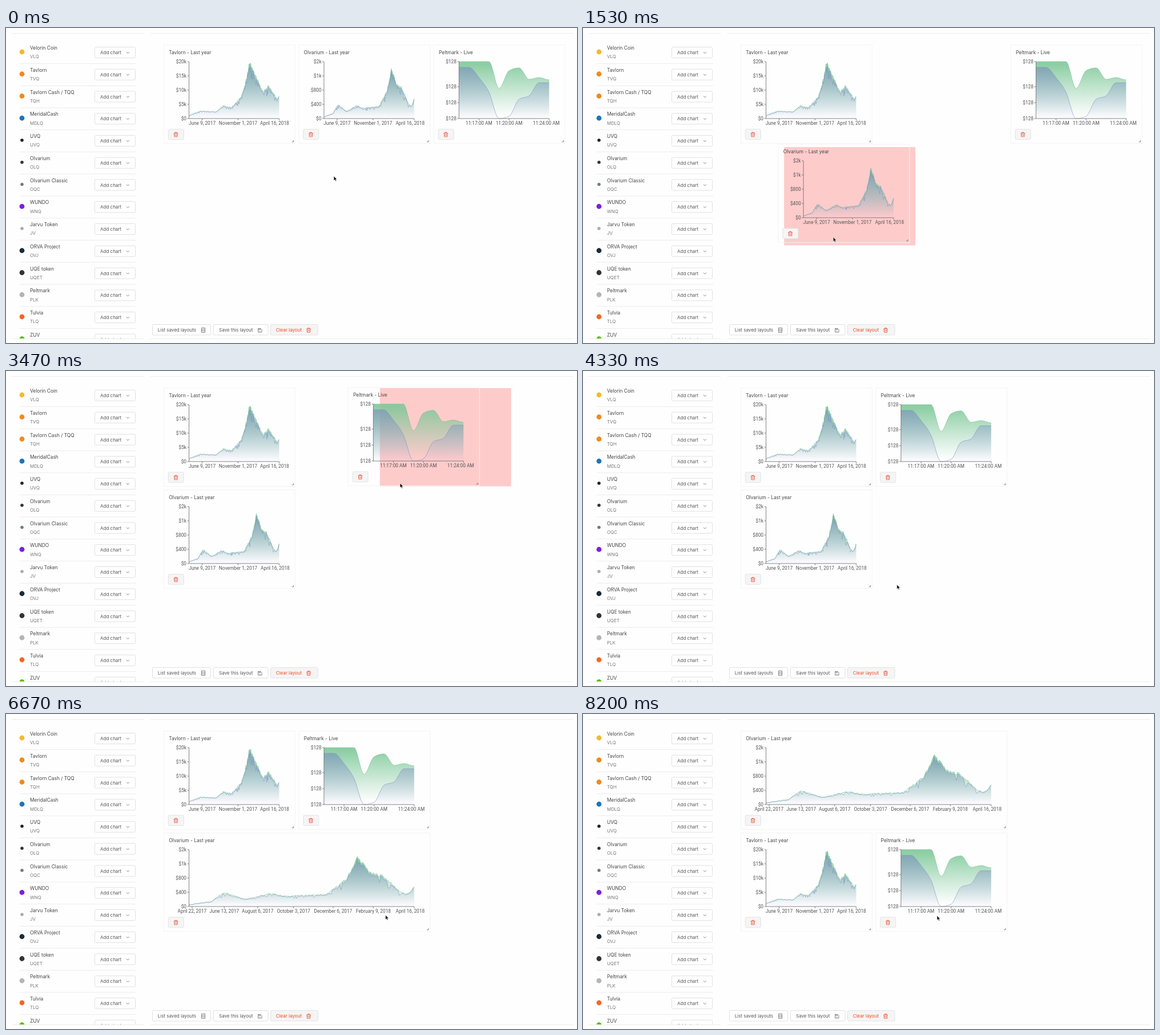
Write an HTML page that moves like this. It is 1000 px wide and 553 px high and loops after 8.27 s.

```html
<!DOCTYPE html>
<html lang="en">
<head>
<meta charset="utf-8">
<title>Coin dashboard</title>
<style>
  html, body { margin: 0; width: 100%; height: 100%; overflow: hidden; background: #fefefe; }
  svg { display: block; width: 100vw; height: 100vh; font: 8.4px Inter, sans-serif; fill: #444; }
  .small { font-size: 8px; fill: #555; }
  .symbol { font-size: 7.9px; fill: #777; }
  .axis { font: 8.3px Roboto, sans-serif; fill: #555; }
  .rule { stroke: #ececec; stroke-width: 1; }
  .button { fill: #fff; stroke: #d9d9d9; stroke-width: .8; }
  .muted { fill: #f5f5f5; stroke: #dedede; }
  .line { fill: none; stroke: #666; stroke-width: .8; }
  .danger { fill: none; stroke: #ea5539; stroke-width: .9; }
</style>
</head>
<body>
<svg viewBox="0 0 1000 553">
  <defs>
    <linearGradient id="green" x2="0" y2="1">
      <stop offset=".05" stop-color="#7cc797" stop-opacity=".87"/>
      <stop offset=".95" stop-color="#82ca9d" stop-opacity="0"/>
    </linearGradient>
    <linearGradient id="blue" x2="0" y2="1">
      <stop offset=".05" stop-color="#7a8cbe" stop-opacity=".58"/>
      <stop offset="1" stop-color="#8c9cd0" stop-opacity=".03"/>
    </linearGradient>
    <clipPath id="list"><rect width="250" height="545"/></clipPath>
    <path id="trash" d="M-3.8-2.3h7.6M-1.5-2.3v-1.5h3v1.5M-2.9-2.3l.3 6.1h5.2l.3-6.1M-1-.5v2.6M1-.5v2.6"/>
  </defs>
  <g id="chrome"></g>
  <g id="cards"></g>
  <path id="pointer" d="M0 0v8l1.9-1.7 1.2 2.8 1.5-.7-1.2-2.6h2.5z" fill="#111" stroke="#fff" stroke-width=".6"/>
</svg>
<script>
const LOOP = 8270, FRAME = 1000 / 15;
const LEFT = 276.5, COLUMN = 59.1, GAP = 6.5, ROWS = [30, 209], HEIGHT = 172.5;
const $ = id => document.getElementById(id);

const mix = (a, b, u) => a + (b - a) * u;
const clamp = (v, lo, hi) => Math.min(hi, Math.max(lo, v));
const ease = u => { u = clamp(u, 0, 1); return u * u * (3 - 2 * u); };
const columnX = n => LEFT + n * COLUMN;
const spanWidth = n => n * COLUMN - GAP;
const text = (x, y, label, attrs = '') => `<text x="${x}" y="${y}" ${attrs}>${label}</text>`;
const box = (x, y, w, h, cls = '') => `<rect class="button ${cls}" x="${x}" y="${y}" width="${w}" height="${h}" rx="2"/>`;
const trash = (x, y) => `<use href="#trash" class="danger" x="${x}" y="${y}"/>`;
const path = (d, cls = 'line') => `<path class="${cls}" d="${d}"/>`;

// Linear interpolation through [position, ...values] key points.
function along(points, at) {
  const i = clamp(points.findIndex(p => p[0] > at), 1, points.length - 1);
  const end = at >= points.at(-1)[0];
  const [a, b] = end ? points.slice(-2) : [points[i - 1], points[i]];
  const u = clamp((at - a[0]) / (b[0] - a[0]), 0, 1);
  return a.slice(1).map((v, k) => mix(v, b[k + 1], u));
}

// ---- static sidebar and toolbar ----
const coins = [
  ['Velorin Coin', 'VLQ', '#f3ba2f'], ['Tavlorn', 'TVQ', '#f08a1d'],
  ['Tavlorn Cash / TQQ', 'TQH', '#f08a1d'], ['MeridalCash', 'MDLQ', '#1c75bc'],
  ['UVQ', 'UVQ', '#222'], ['Olvarium', 'OLQ', '#333'],
  ['Olvarium Classic', 'OQC', '#6d7f78'], ['WUNDO', 'WNQ', '#7a1fe0'],
  ['Jarvu Token', 'JV', '#aaa'], ['ORVA Project', 'OVJ', '#1b2a3a'],
  ['UQE token', 'UQET', '#333'], ['Peltmark', 'PLK', '#b5b5b5'],
  ['Tulvia', 'TLQ', '#f26822'], ['ZUV', 'ZUV', '#58bf00']
];
const slimIcons = ['UVQ', 'OLQ', 'OQC', 'JV'];

const coinRow = ([name, symbol, color], i) => `<g transform="translate(0 ${i * 38.75})">
  <circle cx="28" cy="42" r="${slimIcons.includes(symbol) ? 2.8 : 4.4}" fill="${color}"/>
  ${text(42, 38.2, name)}${text(42, 53.4, symbol, 'class="symbol"')}
  ${box(155.5, 33.5, 71, 19)}${text(165, 46, 'Add chart', 'class="small"')}
  ${path('M211 42l2.4 2.5 2.4-2.5')}${path('M24 62.5H228', 'rule')}</g>`;

$('chrome').innerHTML =
  path('M10 9.5H241M253 9.5H993M10 545.5H241M253 545.5H993', 'rule') +
  `<g clip-path="url(#list)">${coins.map(coinRow).join('')}</g>` +
  box(256.5, 520.5, 102, 18.5) + text(265.7, 533.2, 'List saved layouts', 'class="small"') +
  path('M342.5 526.5h6v8h-6zM342.5 529.2h6M342.5 531.8h6') +
  box(363.5, 520.5, 95.5, 18.5) + text(373, 533.2, 'Save this layout', 'class="small"') +
  path('M441.5 527.5h4.5l2 2v4.5h-6.5zM443 527.5v2h2.5v-2M443.5 532h2') +
  box(463.5, 520.5, 82.5, 18.5, 'muted') +
  text(472.7, 533.2, 'Clear layout', 'class="small" style="fill:#f04a24"') + trash(530, 530.5);

// ---- chart data: [fraction, high, low] ----
const DAYS = 364, MINUTES = 9;
const random = n => { const s = Math.sin(n * 12.9898) * 43758.5453; return s - Math.floor(s); };

// A rough daily price around a few turning points, with now and then a deep low.
const dailySeries = (turns, seed) => Array.from({ length: DAYS / 2 + 1 }, (_, i) => {
  const at = 2 * i / DAYS;
  const high = Math.min(100, along(turns, at)[0] * (1 + .1 * (random(i + seed) - .5)));
  return [at, high, high * (.95 - .25 * random(i + seed * 3) ** 9)];
});

// Monotone cubic through evenly spaced values.
function smoothAt(v, at) {
  const slope = i => {
    const a = v[i] - v[i - 1], b = v[i + 1] - v[i];
    return a * b > 0 ? Math.sign(a) * Math.min(2 * Math.abs(a), 2 * Math.abs(b), Math.abs(a + b) / 2) : 0;
  };
  const k = Math.min(at | 0, v.length - 2), u = at - k, w = 1 - u;
  return v[k] * w * w * (1 + 2 * u) + slope(k) * u * w * w + v[k + 1] * u * u * (3 - 2 * u) - slope(k + 1) * u * u * w;
}
const liveHigh = [100, 100, 100, 100, 53, 84, 89, 69, 72, 68];
const liveLow = [90, 90, 72, 46, 0, 4, 34, 40, 63, 63];
const liveSeries = Array.from({ length: 109 }, (_, i) =>
  [i / 108, smoothAt(liveHigh, i / 12), smoothAt(liveLow, i / 12)]);

const dateLabel = day => new Date(Date.UTC(2017, 3, 17 + day))
  .toLocaleDateString('en-US', { month: 'long', day: 'numeric', year: 'numeric', timeZone: 'UTC' });

// Wider charts have room for more dates.
function dateTicks(w) {
  const days = w < 220 ? [53, 198] : w < 360 ? [54, 124, 203, 284] : [5, 57, 111, 169, 233, 298];
  return [...days, DAYS].map(day => [day / DAYS, dateLabel(day)]);
}
const timeTicks = () => [2, 5, MINUTES].map(m => [m / MINUTES, `11:${15 + m}:00 AM`]);

const cards = {
  first: {
    title: 'Tavlorn - Last year', home: [columnX(0), ROWS[0]], ticks: dateTicks, endShift: 8,
    labels: ['$0', '$5k', '$10k', '$15k', '$20k'],
    series: dailySeries([[0, 5], [.12, 13], [.3, 12], [.38, 23], [.47, 19], [.57, 36], [.62, 56], [.672, 98],
      [.72, 80], [.82, 46], [.88, 57], [.98, 33], [1, 41]], 7)
  },
  live: {
    title: 'Peltmark - Live', home: [columnX(8), ROWS[0]], ticks: timeTicks, endShift: 5,
    levels: [0, 28, 56, 100], labels: Array(4).fill('$128'), series: liveSeries
  },
  second: {
    title: 'Olvarium - Last year', home: [columnX(4), ROWS[0]], ticks: dateTicks, endShift: 7,
    labels: ['$0', '$400', '$800', '$1k', '$2k'],
    series: dailySeries([[0, 3], [.1, 9], [.155, 25], [.25, 13], [.37, 23], [.42, 18], [.61, 21], [.7, 48],
      [.748, 86], [.81, 57], [.86, 54], [.94, 25], [.97, 21], [1, 34]], 31)
  }
};

// ---- motion ----
const pointerPath = [
  [0, 574, 260], [600, 609, 193], [900, 609, 193], [1530, 439, 367], [1750, 383, 372],
  [3000, 840, 198], [3300, 840, 198], [3470, 687, 197], [3650, 612, 200], [4330, 550, 375],
  [4800, 503, 378], [5330, 503, 378], [5930, 696, 361], [6130, 745, 368],
  [6950, 622, 345], [7180, 622, 345], [7400, 601, 227], [7600, 612, 172], [8200, 620, 354]
];
const pointerAt = t => along(pointerPath, t);

const SETTLE = 200, SWAP = 7520;
const resize = { start: 4800, end: 6200 };
const moves = [
  { card: 'second', start: 600, end: 1750, to: [columnX(0), ROWS[1]] },
  { card: 'live', start: 3000, end: 3650, to: [columnX(4), ROWS[0]] },
  { card: 'second', start: 6950, end: 7600, to: [columnX(0), ROWS[0]] },
  { card: 'first', start: SWAP, end: SWAP, to: [columnX(0), ROWS[1]] },
  { card: 'live', start: SWAP, end: SWAP, to: [columnX(4), ROWS[1]] }
];

// Trailing average, the way a short CSS transition follows its goal.
function lag(fn, t, span) {
  let sum = 0;
  for (let i = 0; i < 25; i++) sum += fn(t - span * i / 25);
  return sum / 25;
}

function positionAt(name, t) {
  let pos = cards[name].home;
  for (const m of moves) {
    if (m.card !== name || t < m.start) continue;
    const grab = pointerAt(m.start), now = pointerAt(Math.min(t, m.end));
    const u = ease((t - m.end) / SETTLE), from = pos;
    pos = m.to.map((goal, k) => mix(from[k] + now[k] - grab[k], goal, u));
  }
  return pos;
}

const draggedWidth = t => spanWidth(4) + pointerAt(clamp(t, resize.start, resize.end))[0] - pointerAt(resize.start)[0];
const widthAt = (name, t) => name !== 'second' ? spanWidth(4)
  : mix(lag(draggedWidth, t, 200), spanWidth(8), ease((t - resize.end) / SETTLE));

function snapped(name, t) {
  const [x, y] = positionAt(name, t);
  const column = Math.max(0, Math.round((x - LEFT) / COLUMN));
  return [columnX(column), column >= 4 || y < 58 ? ROWS[0] : ROWS[1]];
}

const placeholder = (x, y, w) =>
  `<rect x="${x}" y="${y}" width="${w}" height="${HEIGHT}" fill="#f00" opacity=".2"/>`;

function chart(card, w, areaWidth) {
  const x0 = 44, base = 129, end = x0 + w;
  const { labels, levels = labels.map((_, i) => i * 25) } = card;
  const area = (k, fill, stroke) => {
    const line = card.series.map(p => `${(x0 + p[0] * areaWidth).toFixed(2)} ${(base - p[k]).toFixed(2)}`).join('L');
    return `<path d="M${x0} ${base}L${line}V${base}Z" fill="url(#${fill})"/>
      <path d="M${line}" fill="none" stroke="${stroke}" stroke-width=".6"/>`;
  };
  const ticks = card.ticks(w);
  return area(1, 'green', '#6fbf8c') + area(2, 'blue', '#7a90c4') +
    path(`M${x0} ${base - 100}V${base}H${end}` +
      levels.map(v => `M${x0 - 3} ${base - v}h3`).join('') +
      ticks.map(([f]) => `M${x0 + f * w} ${base}v3`).join('')) +
    levels.map((v, i) => text(x0 - 4.5, base - v + 3, labels[i], 'class="axis" text-anchor="end"')).join('') +
    ticks.map(([f, label]) => text(x0 + f * w - (f === 1 ? card.endShift : 0), base + 11, label,
      'class="axis" text-anchor="middle"')).join('');
}

function drawCard(name, t) {
  const card = cards[name], [x, y] = positionAt(name, t), w = widthAt(name, t);
  const titleHidden = name === 'live' && t > 5200 && t < 6600;
  return `<g transform="translate(${x} ${y})">
    <rect width="${w}" height="${HEIGHT}" fill="none" stroke="#f4f4f4"/>
    ${titleHidden ? '' : text(8.7, 16, card.title)}
    ${chart(card, w - 72, widthAt(name, t - 30) - 72)}
    ${box(7.8, 147.7, 27, 18, 'muted')}${trash(21, 157)}
    ${path(`M${w - 2.8} 167v2.8h-3`)}</g>`;
}

function draw(t) {
  const drag = moves.find(m => t >= m.start && t < m.end);
  let under = '', over = '';
  if (drag) {
    const goal = k => lag(s => snapped(drag.card, s)[k], t, 125);
    under = placeholder(goal(0), goal(1), widthAt(drag.card, t));
  }
  if (t >= resize.start && t < resize.end) {
    const span = s => spanWidth(Math.round((draggedWidth(s) + GAP) / COLUMN));
    over = placeholder(columnX(0), ROWS[1], lag(span, t, 125));
  }
  const order = ['first', 'live', 'second'].sort((a, b) => (a === drag?.card) - (b === drag?.card));
  $('cards').innerHTML =
    order.map((name, i) => (i === 2 ? under : '') + drawCard(name, t)).join('') + over;
  $('pointer').setAttribute('transform', `translate(${pointerAt(t)})`);
}

let shown = -1;
function tick() {
  // Frame starts are rounded to 10 ms, so allow a few ms of slack.
  const frame = Math.floor((performance.now() % LOOP + 4) / FRAME);
  if (frame !== shown) draw((shown = frame) * FRAME);
  requestAnimationFrame(tick);
}
tick();
</script>
</body>
</html>
```
